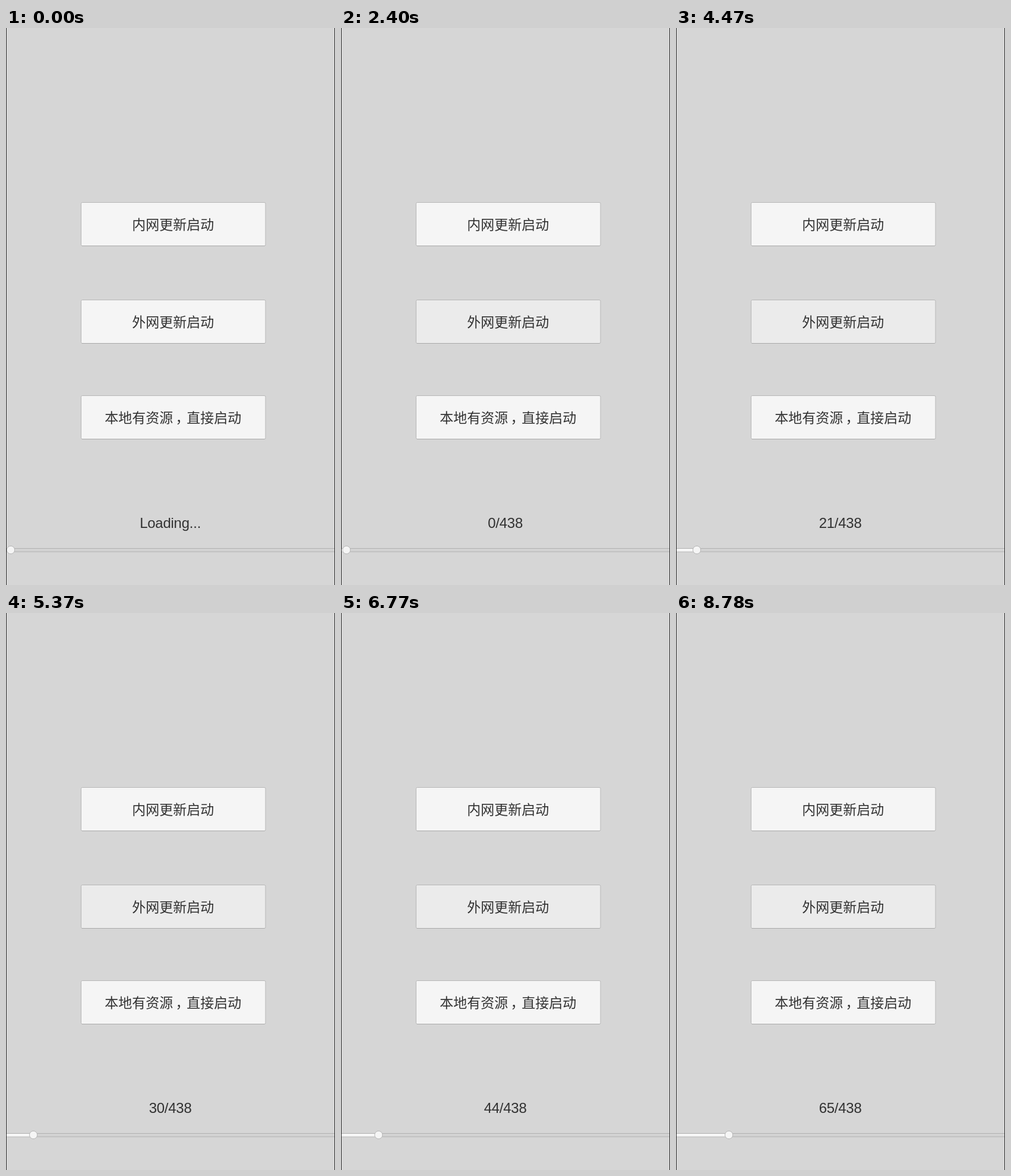
Animation of 554x937 px, one loop 9.9 s. Source, as an HTML page:

```html
<!DOCTYPE html>
<html lang="zh-CN">
<head>
<meta charset="utf-8">
<style>
html, body { margin: 0; width: 100%; height: 100%; overflow: hidden; background: #d6d6d6; }
svg { display: block; width: 554px; height: 937px; }
text { fill: #323232; }
.label { font: 23px "Noto Sans CJK SC", "Noto Sans CJK", sans-serif; }
#status { font: 24px "Liberation Sans", Arial, sans-serif; letter-spacing: -.25px; text-anchor: middle; }
.button rect { fill: #f5f5f5; stroke: #b7b7b7; }
.button path { stroke: #a9a9a9; }
</style>
</head>
<body>
<svg viewBox="0 0 554 937">
  <rect width="554" height="937" fill="#d6d6d6"/>
  <g id="buttons"></g>
  <text id="status" x="276.6" y="841">Loading...</text>
  <rect x="1" y="875.5" width="560" height="5.5" fill="#d3d3d3" stroke="#b0b0b0"/>
  <rect id="fill" x="1" y="876" width="0" height="4.6" fill="#f7f7f7"/>
  <circle id="knob" cx="8" cy="878" r="6.6" fill="#f5f5f5" stroke="#b0b0b0" stroke-width=".9"/>
  <rect width="1" height="937" fill="#2b2b2b"/>
  <rect x="553" width="1" height="937" fill="#2b2b2b"/>
</svg>
<script>
const LOOP = 9900, PRESS = 860, RELEASE = 1780;
const START = 2400, STEP = 98.3, LAST = 65, TOTAL = 438;
const get = id => document.getElementById(id);

function button(y, ...parts) {
  const texts = parts.map(([x, s]) => `<text class="label" x="${x}" y="${y + 46}">${s}</text>`).join("");
  return `<g class="button"><rect x="126.5" y="${y + .5}" width="310.5" height="73" rx="2"/>` +
    `<path d="M128 ${y + 73.5}H435.5"/>${texts}</g>`;
}

get("buttons").innerHTML =
  button(293, [212.2, "内网更新启动"]) +
  button(457, [212.2, "外网更新启动"]) +
  button(618, [166.2, "本地有资源"], [285.5, "，"], [304.2, "直接启动"]);

const [middle, edge] = get("buttons").children[1].children;

function draw(t) {
  const pressed = t >= PRESS && t < RELEASE;
  middle.style.fill = pressed ? "#dcdcdc" : t < PRESS ? "#f5f5f5" : "#ebebeb";
  middle.style.stroke = pressed ? "#a5a5a5" : "#b7b7b7";
  edge.style.stroke = pressed ? "#9b9b9b" : "#a9a9a9";

  const started = t >= START;
  const n = Math.min(LAST, Math.floor((t - START + 10) / STEP));
  get("status").textContent = started ? `${n}/${TOTAL}` : "Loading...";
  // the bar runs one item ahead of the counter
  const x = 8 + (started ? n + 1 : 0) * 538 / TOTAL;
  get("knob").setAttribute("cx", x);
  get("fill").setAttribute("width", started ? x - 1 : 0);
}

function tick(now) {
  draw(now % LOOP);
  requestAnimationFrame(tick);
}
draw(0);
requestAnimationFrame(tick);
</script>
</body>
</html>
```
